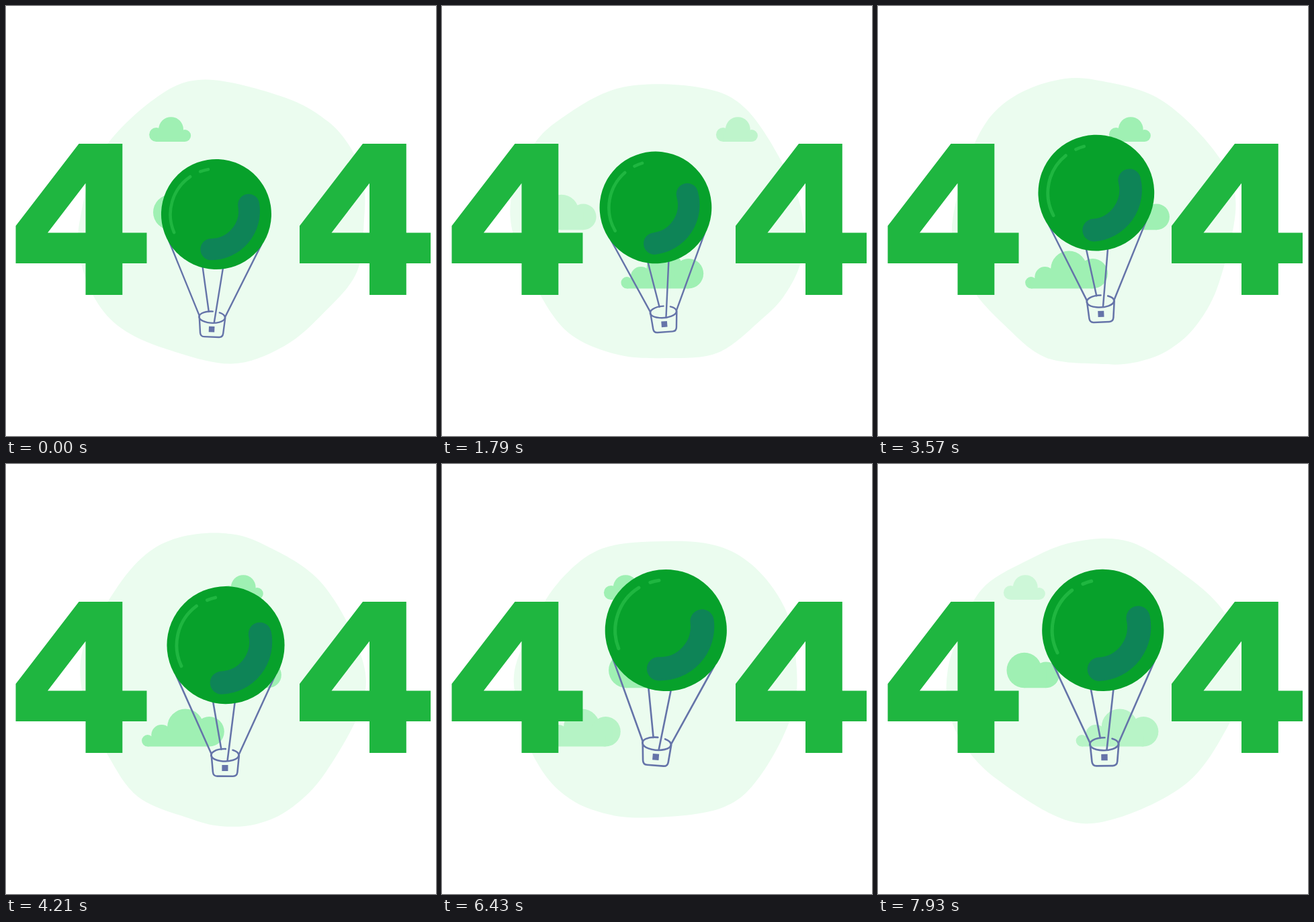
An HTML page for the animation above (8 s loop, 640 by 640 pixels).

```html
<!DOCTYPE html>
<html lang="en">
<head>
<meta charset="utf-8">
<title>404</title>
<style>
  html, body { margin: 0; width: 100%; height: 100%; overflow: hidden; background: #fff; }
  svg { display: block; width: 100%; height: 100%; }
  #blob { fill: #ebfcef; }
  .cloud { fill: #9ff0b3; }
  #digits { fill: #1fb640; }
  #lines { fill: none; stroke: #6574a9; stroke-width: 2.4; stroke-linecap: round; stroke-linejoin: round; }
  #badge { fill: #6574a9; }
  #shine { fill: none; stroke: #1fb640; stroke-width: 4.6; stroke-linecap: round; }
  #shade { fill: none; stroke: #0e8457; stroke-width: 32; stroke-linecap: round; }
</style>
</head>
<body>
<svg viewBox="0 0 640 640" role="img" aria-label="404">
  <path id="blob"/>

  <g class="cloud" id="high">
    <circle cx="10.5" cy="191.5" r="10.5"/><circle cx="32.4" cy="183.6" r="18.4"/>
    <circle cx="53" cy="193" r="9"/><path d="M10.5 190H53V202H10.5Z"/>
  </g>
  <g class="cloud" id="middle">
    <circle cx="26.2" cy="307" r="26.2"/><circle cx="58.7" cy="313.8" r="19.4"/>
    <path d="M26 307H58.7V333.2H26Z"/>
  </g>
  <g class="cloud" id="low">
    <circle cx="8.7" cy="411.8" r="8.7"/><circle cx="29.5" cy="403.3" r="15.3"/>
    <circle cx="65" cy="391.5" r="27"/><circle cx="100.5" cy="398.3" r="22.2"/>
    <path d="M8.7 405H100.5V420.5H8.7Z"/>
  </g>

  <g id="digits">
    <path id="four" fill-rule="evenodd" d="M108.5 205H173.3V337.5H209.5V383H173.3V430H118.5V383H14.5V327.3Z M118.5 263.8L62 337.5H118.5Z"/>
    <use href="#four" x="422.5"/>
  </g>

  <!-- Origin: the pivot of the swing; the inner group is centred on the envelope. -->
  <g id="balloon">
    <g transform="translate(0 14)">
      <g id="lines">
        <path d="M-69 42L-19.2 152M69 42L19.2 152M-17.5 78L-5.5 145.3M13.3 78L3.1 161"/>
        <path d="M10.5 146.2A19.3 8.6 0 1 1 .5 144.7"/>
        <path d="M-19.3 153.3L-17.1 177Q-16.5 182.7 -11 182.7H11Q16.5 182.7 17.1 177L19.3 153.3"/>
      </g>
      <rect id="badge" x="-4.5" y="167" width="8.5" height="8.5"/>
      <circle r="82" fill="#07a12b"/>
      <path id="shine" d="M-41 -54.4A68 68 0 0 0 -61.7 29.5M-26.2 -62.6A68 68 0 0 1 -14.6 -66.3"/>
      <path id="shade" d="M47.6 -16A57 57 0 0 1 -5.6 52.5"/>
    </g>
  </g>
</svg>
<script>
  const LOOP = 8, CYCLE = 7.2;
  const $ = id => document.getElementById(id);
  const clamp = v => Math.max(0, Math.min(1, v));

  // Eased back-and-forth between 0 and 1, each way lasting `half` seconds.
  const pingPong = (t, half) => {
    const phase = (t / half) % 2;
    const u = phase > 1 ? 2 - phase : phase;
    return u * u * (3 - 2 * u);
  };

  // Outline as angle and radius pairs, joined by a closed smooth curve.
  const outline = [
    [0, 208.5], [22, 213], [55, 207], [75, 217], [90, 221], [104, 218],
    [117, 212], [139, 214.5], [160, 203.5], [182, 207], [205, 212], [233, 207],
    [252, 218], [267, 221], [284, 218], [300, 211], [328, 207]
  ].map(([deg, r]) => {
    const a = deg * Math.PI / 180;
    return [r * Math.cos(a), r * Math.sin(a)];
  });

  const smoothPath = points => {
    const n = points.length;
    const at = i => points[(i + n) % n];
    const handle = (i, sign) => at(i).map((v, k) => v + sign * (at(i + 1)[k] - at(i - 1)[k]) / 6);
    return `M${points[0]}` + points.map((_, i) =>
      `C${handle(i, 1)} ${handle(i + 1, -1)} ${at(i + 1)}`).join('') + 'Z';
  };
  $('blob').setAttribute('d', smoothPath(outline));

  // Each cloud drifts left from `x`, fading in after `start` and out before the cycle ends.
  const clouds = [
    { el: $('high'), start: 1.15, x: 431, speed: 36 },
    { el: $('middle'), start: 2.35, x: 401.9, speed: 37.7 },
    { el: $('low'), start: 0, x: 314.1, speed: 26.6 }
  ];
  const FADE = 1.1;

  function draw(t) {
    $('blob').setAttribute('transform', `translate(321.3 321) rotate(${25 * (t - 4.75)})`);

    for (const { el, start, x, speed } of clouds) {
      const age = (t - start + CYCLE) % CYCLE;
      el.setAttribute('transform', `translate(${x - speed * age} 0)`);
      el.setAttribute('opacity', clamp(Math.min(age, CYCLE - age) / FADE));
    }

    const rise = pingPong(t, CYCLE);
    const tilt = 5 - 10 * pingPong(t + 1.25, CYCLE / 2);
    $('balloon').setAttribute('transform',
      `translate(${313.5 + 21.7 * rise} ${296 - 66 * rise}) rotate(${tilt}) scale(${1 + 0.108 * rise})`);
  }

  function tick(now) {
    draw(now / 1000 % LOOP);
    requestAnimationFrame(tick);
  }
  draw(0);
  requestAnimationFrame(tick);
</script>
</body>
</html>
```
